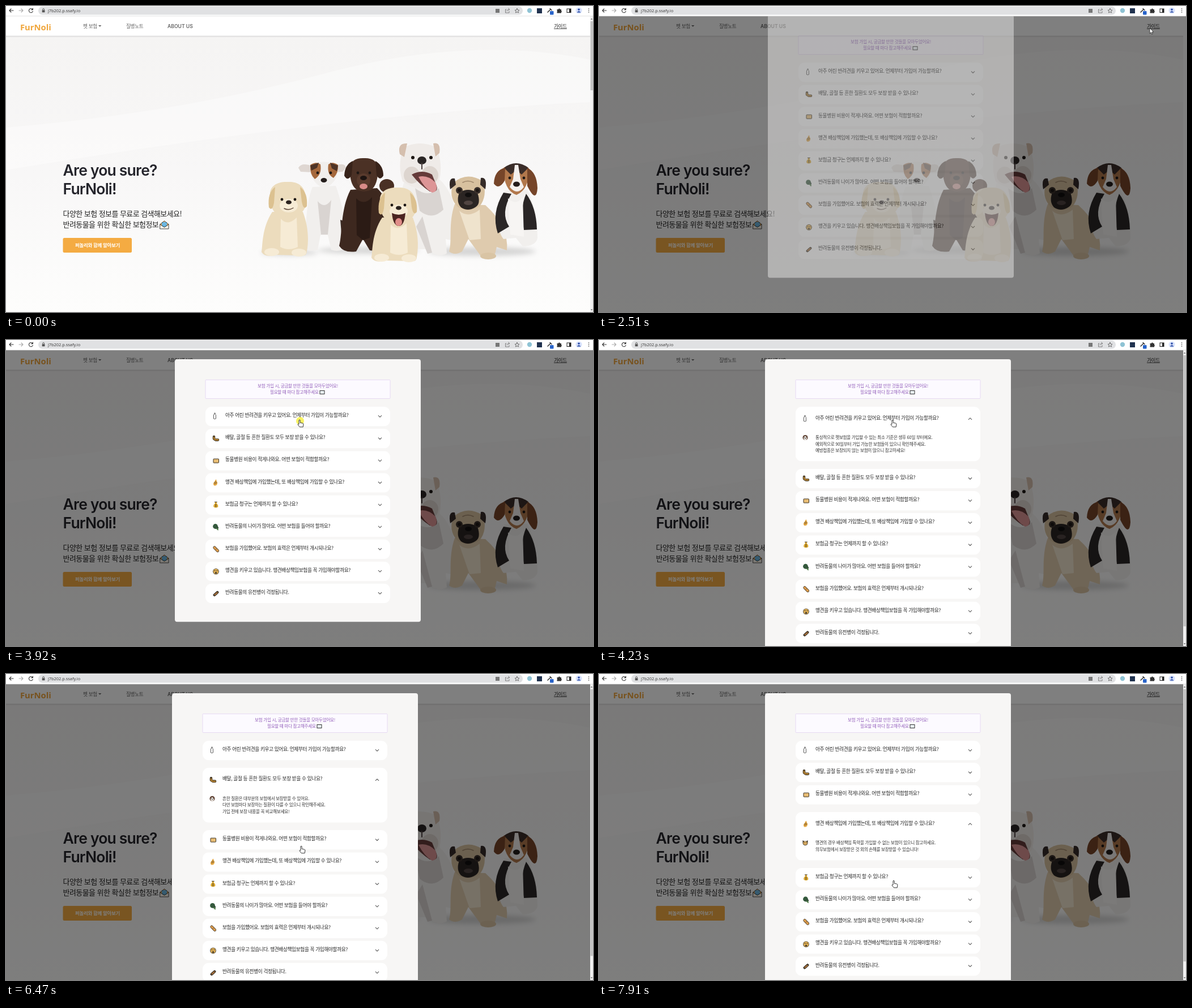
An HTML page for the animation above (8000 ms loop, 1036x541 px).

```html
<!DOCTYPE html>
<html lang="ko">
<head>
<meta charset="utf-8">
<style>
html, body { margin: 0; width: 100%; height: 100%; overflow: hidden; background: #fff; }
svg { display: block; }
text { font-family: Inter, "Noto Sans CJK KR", "Noto Sans CJK", sans-serif; white-space: pre; }
.ko { font-family: "Noto Sans CJK KR", "Noto Sans CJK", sans-serif; letter-spacing: -.04em; }
</style>
</head>
<body>
<svg id="stage" width="1036" height="541" viewBox="0 0 1036 541"></svg>
<script>
const rect = (x, y, w, h, fill, more = '') => `<rect x="${x}" y="${y}" width="${w}" height="${h}" fill="${fill}" ${more}/>`;
const oval = (x, y, rx, ry, fill, more = '') => `<ellipse cx="${x}" cy="${y}" rx="${rx}" ry="${ry}" fill="${fill}" ${more}/>`;
const dot = (x, y, r, fill) => oval(x, y, r, r, fill);
const shape = (d, fill) => `<path d="${d}" fill="${fill}"/>`;
const line = (d, color, w = 1) => `<path d="${d}" fill="none" stroke="${color}" stroke-width="${w}" stroke-linecap="round" stroke-linejoin="round"/>`;
const text = (x, y, size, fill, s, more = '') => `<text class="ko" x="${x}" y="${y}" font-size="${size}" fill="${fill}" ${more}>${s}</text>`;
const eyes = (x1, x2, y, r = 2.4) => dot(x1, y, r, '#1d1714') + dot(x2, y, r, '#1d1714');

// ---- dogs ----
const beige = '#ecdcbd', tan = '#dcc190', cream = '#f6ebd5', white = '#f1efed', shade = '#d9d4d1';
const puppy = (x, y, tongue) => `<g transform="translate(${x} ${y})">` +
  shape('M-27 22C-46 50-44 84-46 93Q-40 103-22 98L22 99Q34 101 34 92C38 70 36 46 27 22Z', beige) +
  shape('M-12 34Q0 48 16 32L18 84Q2 92-13 84Z', cream) +
  oval(-28, 93, 13, 7, cream) + oval(20, 94, 13, 7, cream) +
  shape('M-30-2C-36-26-14-32 0-31C20-32 33-22 32 2C34 22 18 31 2 31C-18 31-31 22-30-2Z', beige) +
  shape('M-22-22Q-36-12-33 14Q-27 22-24 6Z', tan) + shape('M22-22Q36-12 34 12Q28 20 25 4Z', tan) +
  oval(2, 11, 16, 12, cream) + eyes(-10, 13, 0) + oval(2, 5, 5, 3.6, '#2a211d') +
  (tongue ? shape('M-10 14Q2 20 14 14Q12 37 2 37Q-8 36-10 14Z', '#4b2421') + oval(2, 30, 6, 7, '#e08d89')
          : line('M-6 16Q2 20 10 15', '#5d4637', 1.4)) + '</g>';

const dogs =
  // terrier
  shape('M541 320C528 350 530 400 526 428Q534 436 550 431L555 405L568 405L574 431Q588 436 598 428C606 400 592 345 582 318Z', white) +
  shape('M550 345Q562 360 574 343L568 404H556Z', shade) + shape('M590 378Q606 382 606 396L592 402Z', '#3b2b25') +
  shape('M540 283Q522 276 516 286L520 293L541 294ZM582 282Q598 276 600 286L594 293L581 294Z', '#dfd7d2') +
  shape('M537 281Q561 270 586 281Q587 304 574 315Q562 326 549 315Q535 302 537 281Z', white) +
  shape('M537 281Q548 274 555 280Q558 298 545 306Q536 298 537 281ZM586 281Q576 274 569 280Q566 298 578 304Q587 295 586 281Z', '#a5683c') +
  shape('M537 282L552 277L549 286L539 291ZM586 282L572 277L575 287L584 292Z', '#4e3427') +
  eyes(550, 573, 295) + oval(561, 308, 5.5, 4, '#241d1b') +
  // chocolate retriever
  oval(672, 318, 13, 12, '#4a3024') +
  shape('M608 325C590 360 594 400 588 424Q596 437 618 434L630 412L642 432Q664 436 688 420C690 380 678 345 655 322Z', '#3d281f') +
  shape('M618 340Q632 354 646 338L642 410L630 414L619 405Z', '#2b1b15') +
  shape('M607 285Q610 268 632 269Q654 268 657 287Q656 318 644 325Q631 331 618 324Q606 315 607 285Z', '#4b3125') +
  shape('M612 274Q598 280 597 300Q603 311 610 299ZM652 274Q666 282 666 300Q660 310 654 299Z', '#38231a') +
  oval(631, 308, 12, 12, '#593b2d') + eyes(621, 642, 295) + oval(631, 304, 6, 4, '#1e1512') + oval(631, 319, 7, 5, '#d88b88') +
  // bulldog
  shape('M704 308C688 350 692 400 690 430L744 430L754 438Q768 444 778 437L776 412Q796 418 797 402C798 360 785 322 762 304Z', white) +
  shape('M722 322Q745 340 764 322L772 360Q752 380 730 362Z', shade) + shape('M735 372L752 436L744 438L724 390Z', shade) +
  shape('M702 250Q730 236 760 250Q772 280 764 312Q732 334 700 310Q690 280 702 250Z', '#efebe8') +
  shape('M708 243Q690 242 695 262L703 267ZM754 243Q768 240 765 260L758 266Z', '#d5bfae') +
  oval(716, 299, 14, 15, '#ddd5cf') + oval(748, 299, 15, 16, '#ddd5cf') +
  shape('M716 298Q734 288 752 298L760 318Q764 330 748 328Q730 316 716 298Z', '#653a39') +
  shape('M728 302Q744 298 758 312Q764 328 752 330Q738 322 728 302Z', '#dd9596') +
  eyes(718, 750, 268, 3) + oval(734, 273, 8, 7, '#2a2524') + line('M734 278V288', '#4c4140', 2) +
  puppy(497, 342, false) + puppy(691, 352, true) +
  // pug
  shape('M792 350C780 385 788 414 782 434Q792 442 805 434L816 412L838 442Q850 452 862 443L866 426L884 432Q888 390 846 352Z', '#dfcbae') +
  shape('M800 362Q816 376 836 360L838 412L818 414Z', '#efe3cd') + oval(851, 442, 14, 6, '#d9c4a4') +
  shape('M790 312Q814 292 842 310Q850 336 836 354Q815 368 796 354Q780 336 790 312Z', '#d8c19f') +
  shape('M792 305Q780 302 784 324L794 316ZM838 304Q850 302 846 324L837 316Z', '#352b28') +
  shape('M800 330Q815 320 832 330Q839 350 828 356Q815 364 803 356Q794 346 800 330Z', '#2b2523') +
  dot(800, 326, 6, '#3a302b') + dot(832, 326, 6, '#3a302b') + eyes(800, 832, 326, 3) +
  line('M806 312Q815 307 825 312', '#9e866b', 1.5) + oval(816, 334, 6, 4, '#110f0f') + oval(816, 348, 8, 4, '#514542') +
  // beagle
  shape('M880 326C860 360 866 396 878 412L900 410L912 425Q936 424 938 410C938 370 930 345 920 325Z', white) +
  shape('M878 330Q856 366 868 402L888 390Q872 366 892 332ZM918 332Q936 356 937 395L914 396Q906 360 918 332Z', '#2a2626') +
  shape('M886 340Q900 354 912 338L914 408L890 404Z', '#f7f5f3') +
  shape('M878 286Q900 276 923 287Q924 324 901 334Q878 326 878 286Z', '#b2784c') +
  shape('M879 286Q900 270 922 286L910 298L901 290L891 298Z', '#3b2d29') +
  shape('M898 281H904L908 306L914 320Q902 336 889 320L895 306Z', '#f4f0ed') +
  shape('M881 286Q862 290 861 314Q870 326 880 309ZM920 286Q937 294 938 322Q936 350 920 318Z', '#764529') +
  eyes(889, 914, 304) + oval(901, 315, 6, 4.5, '#231c1b');

// ---- page ----
const envelope = shape('M272 386L279 380L287 386V394H272Z', '#f0b15c') + rect(275, 382, 9, 9, '#6db8e2') +
  shape('M272 387L279.5 392L287 387V394H272Z', '#f7f1e8') + line('M272 386L279.5 380L287 386V394H272ZL279.5 391L287 386', '#333', .9);
const page =
  rect(0, 18, 1036, 523, '#fff') + rect(0, 53, 1031, 488, 'url(#hero)') +
  shape('M0 215Q300 190 560 120T1031 95V170Q600 190 0 290Z', '#fff5') +
  rect(0, 53, 1031, 2, '#0001') + rect(0, 52.5, 1031, 1, '#e2e2e2') +
  `<text x="25" y="42.5" font-size="14.8" fill="#f0a63c" style="font-family:'Noto Sans',sans-serif;font-weight:800">FurNoli</text>` +
  text(136, 38.7, 8.64, '#666', '펫 보험', 'font-weight="500"') + shape('M163 34H168.4L165.7 36.8Z', '#666') +
  text(212, 38.7, 8.64, '#666', '질병노트', 'font-weight="500"') +
  '<text x="285" y="38.7" font-size="8.64" fill="#666" font-weight="600">ABOUT US</text>' +
  text(967, 38.7, 8.64, '#222', '가이드', 'font-weight="500" text-decoration="underline"') +
  ['Are you sure?', 'FurNoli!'].map((s, i) =>
    `<text x="100.5" y="${300 + 32.5 * i}" font-size="26.5" letter-spacing="-.03em" fill="#24242b" font-weight="600">${s}</text>`).join('') +
  text(100.5, 371.7, 12.95, '#222', '다양한 보험 정보를 무료로 검색해보세요!', 'font-weight="500"') +
  text(100.5, 391.4, 12.95, '#222', '반려동물을 위한 확실한 보험정보', 'font-weight="500"') + envelope +
  rect(100.5, 410, 121.5, 26, '#f4ab42', 'rx="2.5"') +
  text(161.5, 425.8, 8.5, '#fff', '퍼놀리와 함께 알아보기', 'font-weight="700" text-anchor="middle"') +
  `<g filter="url(#soft)" opacity=".28">${oval(500, 436, 50, 5, '#777')}${oval(640, 432, 90, 6, '#777')}${oval(840, 434, 95, 8, '#777')}</g>` + dogs;

const browserBar =
  rect(0, 0, 1036, 18, '#fff') + rect(0, 17.5, 1036, .7, '#d8d8d8') + rect(57, 1, 855, 14.5, '#e0e1e3', 'rx="7.2"') +
  line('M13 8H6M9 5L6 8L9 11', '#333', 1.1) + line('M23 8H30M27 5L30 8L27 11', '#aaa', 1.1) +
  line('M47 6A3.6 3.6 0 1 0 47.4 9.4M47.4 4V6.6H44.8', '#333', 1.1) +
  rect(63.7, 7.2, 4.8, 4, '#555', 'rx=".5"') + line('M64.7 7V6A1.4 1.4 0 0 1 67.5 6V7', '#555', .9) +
  `<text x="74" y="10.9" font-size="7.4" fill="#333" style="font-family:'Open Sans',sans-serif">j7b202.p.ssafy.io</text>` +
  rect(864, 5, 7, 7, '#777') + line('M883 6H881.5V12H888V9.5M884 9Q884 6 888.5 6M886.5 4L888.7 6L886.5 8', '#666', .8) +
  line('M902 4.3L903.2 7L906 7.3L903.9 9.2L904.5 12L902 10.5L899.5 12L900.1 9.2L898 7.3L900.8 7Z', '#555', .8) +
  dot(924, 8, 4.2, '#8fc3d4') + rect(937, 4, 9, 9, '#20324f') +
  line('M956 11L961 6M960 4.5L963 7.5', '#333', 1.5) + rect(960, 9, 6.5, 6.5, '#2863c9', 'rx="1"') +
  shape('M972.5 6H975A1.4 1.4 0 0 1 977.8 6H980V8.4A1.4 1.4 0 0 1 980 11V12.5H972.5V10A1.3 1.3 0 0 0 972.5 8Z', '#333') +
  rect(990, 5, 7, 6.5, 'none', 'stroke="#222"') + rect(994, 5, 3, 6.5, '#222') +
  dot(1011, 8, 5.6, '#d8e2fb') + dot(1011, 6.3, 1.8, '#2f4fa8') + shape('M1007.5 11.5Q1011 6.5 1014.5 11.5Z', '#2f4fa8') +
  [5, 8, 11].map(y => dot(1028.5, y, .8, '#333')).join('');

// ---- accordion ----
const ink = '#3a3328';
const icons = [
  line('M15.4 13.5L16 11H17L17.6 13.5Q18.4 14 18.4 15V21Q16.5 22.4 14.4 21V15Q14.4 14 15.4 13.5Z', '#444', .9),
  line('M15 14V17.5L18 19.5H22', ink, 4.6) + line('M15 14V17.5L18 19.5H22', '#a8792f', 3) + dot(15, 13.5, 1, ink),
  rect(14, 14, 9.5, 7, '#e8bd74', `rx=".8" stroke="${ink}"`),
  shape('M15 22Q12.6 18 15.5 16L18 11.5Q20 11 19.4 14Q22 16 20.5 20Q19 23 15 22Z', '#e5a844') + line('M15.5 17L19 15M16 19L20 17', ink, .7),
  shape('M16.4 12H20.3L19.5 14.5Q23 17 22.2 20.5Q18.4 23.5 14.4 20.5Q13.5 17 17 14.5Z', '#d9a62f') + line('M16.4 12H20.3M18.3 16V20.5', ink, 1),
  dot(17.5, 16, 4.4, '#355a3d') + dot(20.5, 18.5, 2.5, '#2f4a37') + line('M20 19L22 22', '#4c7a45', 2),
  line('M16 14.5L21.5 20', ink, 5.2) + line('M16 14.5L21.5 20', '#d99a4c', 3.8) + line('M18 18L19.5 16.5', ink, .7),
  dot(18.5, 17.5, 5.3, ink) + dot(18.5, 17.5, 4.5, '#e5b457') + eyes(16.7, 20.3, 16.2, .8) + oval(18.5, 20, 1.8, 1.4, ink),
  line('M16 20L21 15.5', ink, 4.6) + shape('M13 20L15.5 22.5L16.5 19ZM24 15L21 12.8L20.3 16.4Z', ink) + line('M16.5 19.6L20.6 16', '#a66f3a', 2.4)
];
const dogFace = dot(17, 54.5, 4.5, '#5d4032') + oval(17, 55.5, 2.7, 3.4, '#f6f2ec') + eyes(15.5, 18.5, 54, .7) + dot(17, 56, .9, '#333');
const catFace = shape('M12.5 50L15 51.5H19L21.5 50V55Q21 59 17 59T12.5 55Z', ink) + oval(17, 55, 3.6, 3, '#e8b868') + eyes(15.5, 18.5, 54.5, .7);
const questions = [
  '아주 어린 반려견을 키우고 있어요. 언제부터 가입이 가능할까요?', '배탈, 골절 등 흔한 질환도 모두 보장 받을 수 있나요?',
  '동물병원 비용이 적게나와요. 어떤 보험이 적합할까요?', '맹견 배상책임에 가입했는데, 또 배상책임에 가입할 수 있나요?',
  '보험금 청구는 언제까지 할 수 있나요?', '반려동물의 나이가 많아요. 어떤 보험을 들어야 할까요?',
  '보험을 가입했어요. 보험의 효력은 언제부터 개시되나요?', '맹견을 키우고 있습니다. 맹견배상책임보험을 꼭 가입해야할까요?',
  '반려동물의 유전병이 걱정됩니다.'];
const answers = [
  ['통상적으로 펫보험을 가입할 수 있는 최소 기준은 생후 60일 부터에요.', '예외적으로 90일부터 가입 가능한 보험들이 있으니 확인해주세요.', '예방접종은 보장되지 않는 보험이 많으니 참고하세요!'],
  ['흔한 질환은 대부분의 보험에서 보장받을 수 있어요.', '다만 보험마다 보장하는 질환이 다를 수 있으니 확인해주세요.', '가입 전에 보장 내용을 꼭 비교해보세요!'],
  ['자기부담금이 적은 보험을 가입하는게 좋겠어요.', '진료비가 적게 나올 경우, 자기부담금을 공제했을 때 보장받을 수 있는 비용이 없거나', '적을 수 있어요.', '',
    '<tspan text-decoration="underline">통원보장금액이 궁금하다면?</tspan> 퍼놀리의 보장금액 계산기능을 이용해보세요.'],
  ['맹견의 경우 배상책임 특약을 가입할 수 없는 보험이 있으니 참고하세요.', '의무보험에서 보장받은 것 외의 손해를 보장받을 수 있습니다!']];
const lineHeight = 11.4;
const answerMarkup = (lines, i) => (i == 2 ? rect(150, 95.5, 54.5, 9.5, '#fbd9b5') : '') + (i == 3 ? catFace : dogFace) +
  lines.map((s, k) => text(35, 57.3 + lineHeight * k, 7.6, '#333', s)).join('');
const item = (q, i) => `<svg class="item" x="352" width="326" height="34.5">${rect(0, 0, 326, '100%', '#fff', 'rx="11"')}
  <g class="head">${icons[i]}${text(35, 18.3, 8.64, '#222', q, 'font-weight="500"')}
  <g class="chevron">${line('M-2.7-1.3L0 1.4L2.7-1.3', '#666', 1.2)}</g></g>
  <g class="answer">${answers[i] ? answerMarkup(answers[i], i) : ''}</g></svg>`;
const modal = rect(298, 34, 434, 464, '#f7f6f5', 'rx="4" id="panel"') +
  rect(352, 70.5, 326, 33, '#fcfaff', 'stroke="#e2d3f1" stroke-width=".8" rx="1"') +
  text(515, 83.8, 7.6, '#9460bb', '보험 가입 시, 궁금할 만한 것들을 모아두었어요!', 'text-anchor="middle"') +
  text(466, 95.2, 7.6, '#9460bb', '필요할 때 마다 참고해주세요') + rect(554, 89.5, 8, 6, '#e9f1f4', 'stroke="#333"') +
  questions.map(item).join('');

const pointers = {
  hand: '<path d="M-1 .8Q0-.6 1.2.8V5.2L5.8 6.2Q7 6.6 6.9 8L6.2 12.8H.4L-3 8.6Q-3 6.8-1 8Z" fill="#fff" stroke="#222" stroke-width=".9"/>',
  arrow: '<path d="M0 0V9.6L2.2 7.6L3.7 10.8L5.2 10.1L3.8 7H6.8Z" fill="#fff" stroke="#222" stroke-width=".8"/>',
  beam: line('M-.7 0Q1 0 1 1Q1 0 2.7 0M1 1V8M-.7 9Q1 9 1 8Q1 9 2.7 9', '#222', .9)
};
const $ = id => document.getElementById(id);
const all = cls => [...document.getElementsByClassName(cls)];
$('stage').innerHTML = `<defs>
  <linearGradient id="hero" x2="0" y2="1"><stop stop-color="#f5f4f3"/><stop offset=".5" stop-color="#f8f7f7"/><stop offset="1" stop-color="#fdfdfc"/></linearGradient>
  <filter id="soft" x="-20%" y="-100%" width="140%" height="300%"><feGaussianBlur stdDeviation="4"/></filter></defs>` +
  page + rect(0, 18, 1036, 523, '#000', 'id="shade"') + `<g id="modal">${modal}</g>` +
  `<g id="bar">${rect(1031, 18, 5, 523, '#f1f1f1')}${shape('M1031.8 24L1033.5 21.5L1035.2 24ZM1031.8 536L1033.5 538.5L1035.2 536Z', '#777')}${rect(1031.5, 27, 4.2, 122, '#c1c1c1', 'id="thumb"')}</g>` +
  browserBar + `<g id="cursor"><circle id="glow" cx="1" cy="2" r="7" fill="#f5ee2c" opacity=".75"/>` +
  Object.entries(pointers).map(([name, art]) => `<g id="${name}">${art}</g>`).join('') + '</g>';
const items = all('item'), heads = all('head'), chevrons = all('chevron'), bodies = all('answer');

// ---- motion ----
const clamp = v => Math.min(1, Math.max(0, v));
function bezier(x, x1, x2) { // cubic-bezier(x1, 0, x2, 1)
  x = clamp(x);
  let lo = 0, hi = 1, s = x;
  for (let i = 0; i < 18; i++) {
    s = (lo + hi) / 2;
    if (3 * (1 - s) ** 2 * s * x1 + 3 * (1 - s) * s * s * x2 + s ** 3 < x) lo = s; else hi = s;
  }
  return 3 * s * s - 2 * s ** 3;
}
const opens = [3985, 5390, 6570, 7630];
const presses = [[2330, 2400], [3920, 3985], [5310, 5375], [6490, 6570], [7550, 7630]];
const path = [[410, 1028, 538], [1210, 971, 48], [1240, 971, 48], [1310, 972, 39], [2600, 972, 39], [3100, 572, 158], [3140, 572, 158],
  [3460, 518, 141], [4420, 518, 141], [4580, 524, 222], [4770, 524, 222], [4910, 529, 243], [5640, 529, 243], [5760, 521, 304],
  [7350, 521, 304], [7500, 520, 365], [8000, 520, 365]];
const pointerTimes = [[0, 'arrow'], [1240, 'hand'], [2450, 'arrow'], [3050, 'hand'], [4480, 'arrow'], [4790, 'hand'], [6640, 'beam'], [7440, 'hand']];
const within = (t, [a, b]) => t >= a && t < b;
const show = (el, on) => el.setAttribute('visibility', on ? 'visible' : 'hidden');
const move = (el, x, y, more = '') => el.setAttribute('transform', `translate(${x} ${y}) ${more}`);

function drawAccordion(t) {
  const openness = (i, ms) => {
    const step = at => at ? bezier((t - at) / ms, .4, .2) : 0;
    return step(opens[i]) - (i < opens.length ? step(opens[i + 1]) : 0);
  };
  let y = 118;
  items.forEach((el, i) => {
    const m = openness(i, 150), grow = 8.7 * m;
    const full = answers[i] ? answers[i].length * lineHeight + 19.6 : 0;
    const h = 34.5 + grow + full * openness(i, 280);
    if (i) y += grow;
    el.setAttribute('y', y);
    el.setAttribute('height', h);
    move(heads[i], 0, grow / 2);
    move(chevrons[i], 308, 17, `rotate(${180 * m})`);
    move(bodies[i], 0, grow - 8.7);
    bodies[i].setAttribute('opacity', m > 0 ? 1 : 0);
    y += h + 4.6 + grow;
  });
  return y + 28.4;
}

function drawCursor(t) {
  const k = Math.max(0, path.findLastIndex(p => p[0] <= t)), a = path[k], b = path[k + 1] || a;
  const p = bezier((t - a[0]) / (b[0] - a[0] || 1), .35, .6);
  move($('cursor'), a[1] + (b[1] - a[1]) * p, a[2] + (b[2] - a[2]) * p);
  const name = pointerTimes.findLast(p => p[0] <= t)[1];
  for (const key in pointers) show($(key), t >= 410 && key == name);
  show($('glow'), presses.some(span => within(t, span)));
}

function draw() {
  const t = performance.now() % 8000;
  const bottom = drawAccordion(t), scrolls = bottom > 541, hasModal = t >= 2445;
  $('panel').setAttribute('height', bottom - 34);
  $('shade').setAttribute('opacity', .5 * clamp((t - 2340) / 105));
  $('modal').setAttribute('opacity', clamp((t - 2445) / 150));
  move($('modal'), scrolls ? -5 : 0, 27 * (bezier((t - 2445) / 300, 0, .58) - 1));
  $('bar').setAttribute('display', t < 2340 || hasModal && scrolls ? 'inline' : 'none');
  $('thumb').setAttribute('height', hasModal ? 505 * 523 / (bottom - 18) : 122);
  drawCursor(t);
  requestAnimationFrame(draw);
}
draw();
</script>
</body>
</html>
```
